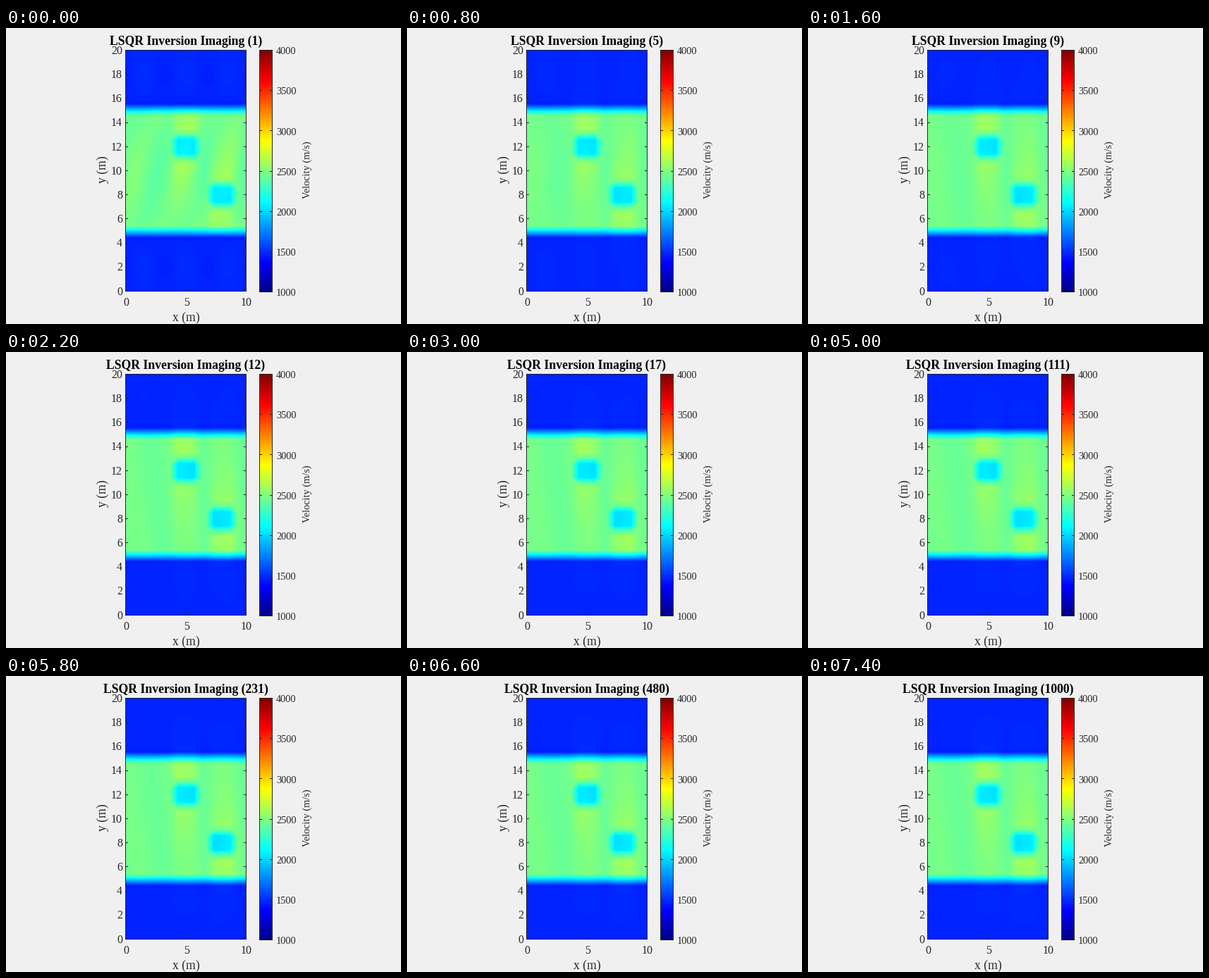
Animation of 560x420 px, one loop 7.6 s. Source, as a matplotlib script:

```python
import numpy as np
import matplotlib.pyplot as plt
from matplotlib.animation import FuncAnimation
from matplotlib.colors import ListedColormap

W, H, DPI = 560, 420, 100
FRAMES, STEP = 38, 200
LEFT, RIGHT, TOP, BOTTOM = 169.5, 340.5, 31.5, 373.5
BAR_L, BAR_R, BAR_BOTTOM = 359.5, 377.5, 374.5
INK = (0.15, 0.15, 0.15)
BLOCKS = ((5, 12), (8, 8))  # centres of the slow blocks, in metres

plt.rcParams["font.family"] = "Liberation Serif"

X, Y = np.meshgrid(np.linspace(0, 10, 172), np.linspace(20, 0, 343))
GAP = np.maximum(np.abs(Y - 10) - 5.45, 0)  # distance outside the layer


def jet(n=256):
    t = 4 * (np.arange(n) + 1) / n
    rgb = [np.clip(1.5 - np.abs(t - c), 0, 1) for c in (3, 2, 1)]
    return ListedColormap(np.column_stack(rgb))


def plateau(u, half, ramp):
    """One for |u| < half, with linear edges centred on half."""
    return np.clip(0.5 + (half - np.abs(u)) / ramp, 0, 1)


def octagon(dx, dy):
    dx, dy = np.abs(dx), np.abs(dy)
    d = np.maximum.reduce([(dx - 0.7) / 0.6, (dy - 0.6) / 0.5, (dx + dy - 1.2) / 0.65])
    return 1 - np.clip(d, 0, 1)


def count(k):
    """Plain counting first, then geometric growth up to 1000."""
    if k < 15:
        return k + 1
    return int(10 ** (3 - 0.0795 * (FRAMES - 1 - k)))


def field(k):
    early = 0.72 ** k
    layer = plateau(Y - 10, 5.08, 0.95)

    # Rock outside the layer: slight undershoot and fading ripples
    ripple = np.cos(2 * np.pi * (X - 5) / 3.5) * np.exp(-((np.abs(Y - 10) - 8) / 1.3) ** 2)
    rock = 1480 - 35 * np.exp(-GAP / 0.3) + 20 * early * ripple

    # Layer: steady vertical bands and a fading slanted wave
    mid = 2450 + 22 * np.cos(np.pi / 2 * (X - 0.6 - 0.12 * (10 - Y)))
    mid += 38 * early * np.cos(2 * np.pi * (X - 8.6 - 0.33 * (Y - 11)) / 3.7)

    for cx, cy in BLOCKS:
        column = plateau(X - cx, 1.0, 0.8)
        for side in (-1, 1):
            room = 5 + side * (10 - cy)
            out = side * (Y - cy) - 1.2
            lobe = np.clip(out / 0.3, 0, 1) * np.exp(-np.maximum(out, 0) * room / 20)
            mid += (165 - 9 * room) * column * lobe
            plume = column * np.exp(-GAP / 0.7) * (out > 0)
            rock += 120 / room * (1 - early) * plume
        mid -= 410 * octagon(X - cx, Y - cy)

    return rock + (mid - rock) * layer


fig = plt.figure(figsize=(W / DPI, H / DPI), dpi=DPI, facecolor=(240 / 255,) * 3)
ax = fig.add_axes([0, 0, 1, 1])
cmap = jet()


def picture(data, low, high, x0, x1, y1):
    return ax.imshow(data, vmin=low, vmax=high, cmap=cmap, aspect="auto",
                     interpolation="nearest",
                     extent=(x0 - 0.5, x1 + 0.5, y1 + 0.5, TOP - 0.5))


image = picture(field(0), 1000, 4000, LEFT, RIGHT, BOTTOM)
picture(np.linspace(1, 0, 256)[:, None], 0, 1, BAR_L, BAR_R, BAR_BOTTOM)
ax.set_xlim(0, W)
ax.set_ylim(H, 0)
ax.axis("off")


def line(xs, ys):
    ax.plot(xs, ys, color=INK, lw=0.72, solid_capstyle="butt", snap=False)


def box(x0, x1, y1):
    line([x0, x1, x1, x0, x0], [TOP, TOP, y1, y1, TOP])


def side_ticks(x0, x1, y, size=3.5):
    y = np.floor(y) + 0.5
    line([x0, x0 + size], [y, y])
    line([x1 - size, x1], [y, y])


def label(x, y, text, px, **kw):
    return ax.text(x, y, text, fontsize=px * 72 / DPI, **{"color": INK, **kw})


box(LEFT, RIGHT, BOTTOM)
box(BAR_L, BAR_R, BAR_BOTTOM)

for m in range(0, 21, 2):
    y = BOTTOM - (BOTTOM - TOP) * m / 20
    side_ticks(LEFT, RIGHT, y)
    label(165, y + 5.2, str(m), 16, ha="right")

for m in (0, 5, 10):
    x = np.floor(LEFT + (RIGHT - LEFT) * m / 10) + 0.5
    line([x, x], [BOTTOM, BOTTOM - 3.5])
    line([x, x], [TOP, TOP + 3.5])
    label(x + 0.5, 394, str(m), 16, ha="center")

for v in range(1000, 4001, 500):
    y = BAR_BOTTOM - (BAR_BOTTOM - TOP) * (v - 1000) / 3000
    side_ticks(BAR_L, BAR_R, y)
    label(383, y + 5.8, str(v), 14.4)

label(255, 416, "x (m)", 17.6, ha="center")
label(137, 200.5, "y (m)", 17.6, rotation=90, ha="center", va="center")
label(427, 201, "Velocity (m/s)", 14.4, rotation=90, ha="center", va="center")
title = label(255, 24, "", 17.6, ha="center", weight="bold", color="black")


def update(k):
    image.set_data(field(k))
    title.set_text(f"LSQR Inversion Imaging ({count(k)})")
    return image, title


anim = FuncAnimation(fig, update, frames=FRAMES, interval=STEP, repeat=True,
                     repeat_delay=0, init_func=lambda: update(0))
plt.show()
```
